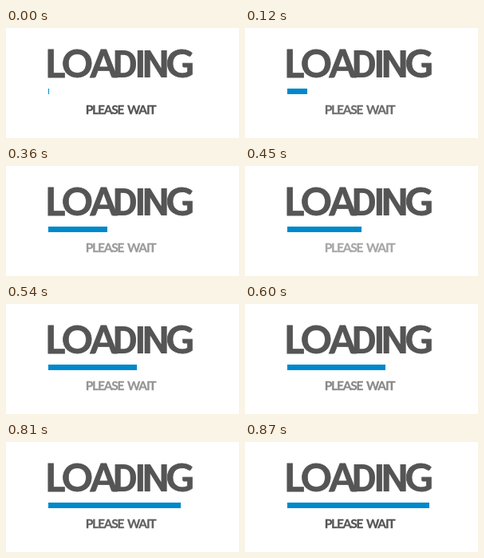
Write an HTML page that moves like this. It is 292x138 px and loops after 900 ms.

```html
<!DOCTYPE html>
<html lang="en">
<meta charset="utf-8">
<title>Loading</title>
<style>
  html, body { margin: 0; height: 100%; overflow: hidden; background: #fff; }
  svg { display: block; width: 292px; height: 138px; }
  text { font-family: Lato, sans-serif; font-weight: 700; fill: #555; }
  #title { font-size: 48.5px; stroke: #555; stroke-width: .8px; }
  #title .narrow { font-family: Roboto, sans-serif; stroke: none; }
  #wait { font-size: 15.5px; letter-spacing: -1.2px; stroke: #555; stroke-width: .3px; }
</style>
<svg viewBox="0 0 292 138">
  <text id="title" y="62.3" x="49 69.8 105.5 133.5 161.3 170.5 200.5">LOA<tspan class="narrow">DIN</tspan>G</text>
  <rect id="bar" x="53" y="76" height="7" fill="#08c"/>
  <text id="wait" y="107.8"><tspan x="99.7">PLEASE </tspan><tspan x="152">WAIT</tspan></text>
</svg>
<script>
  const LOOP = 900, STEP = 30, LAST = LOOP / STEP - 1, FULL_WIDTH = 178;
  const bar = document.getElementById('bar');
  const wait = document.getElementById('wait');

  function draw(now) {
    const phase = Math.floor((now % LOOP) / STEP) / LAST;
    bar.setAttribute('width', Math.round(1 + phase * (FULL_WIDTH - 1)));
    wait.setAttribute('opacity', 0.5 + Math.abs(phase - 0.5));
    requestAnimationFrame(draw);
  }
  requestAnimationFrame(draw);
</script>
</html>
```
